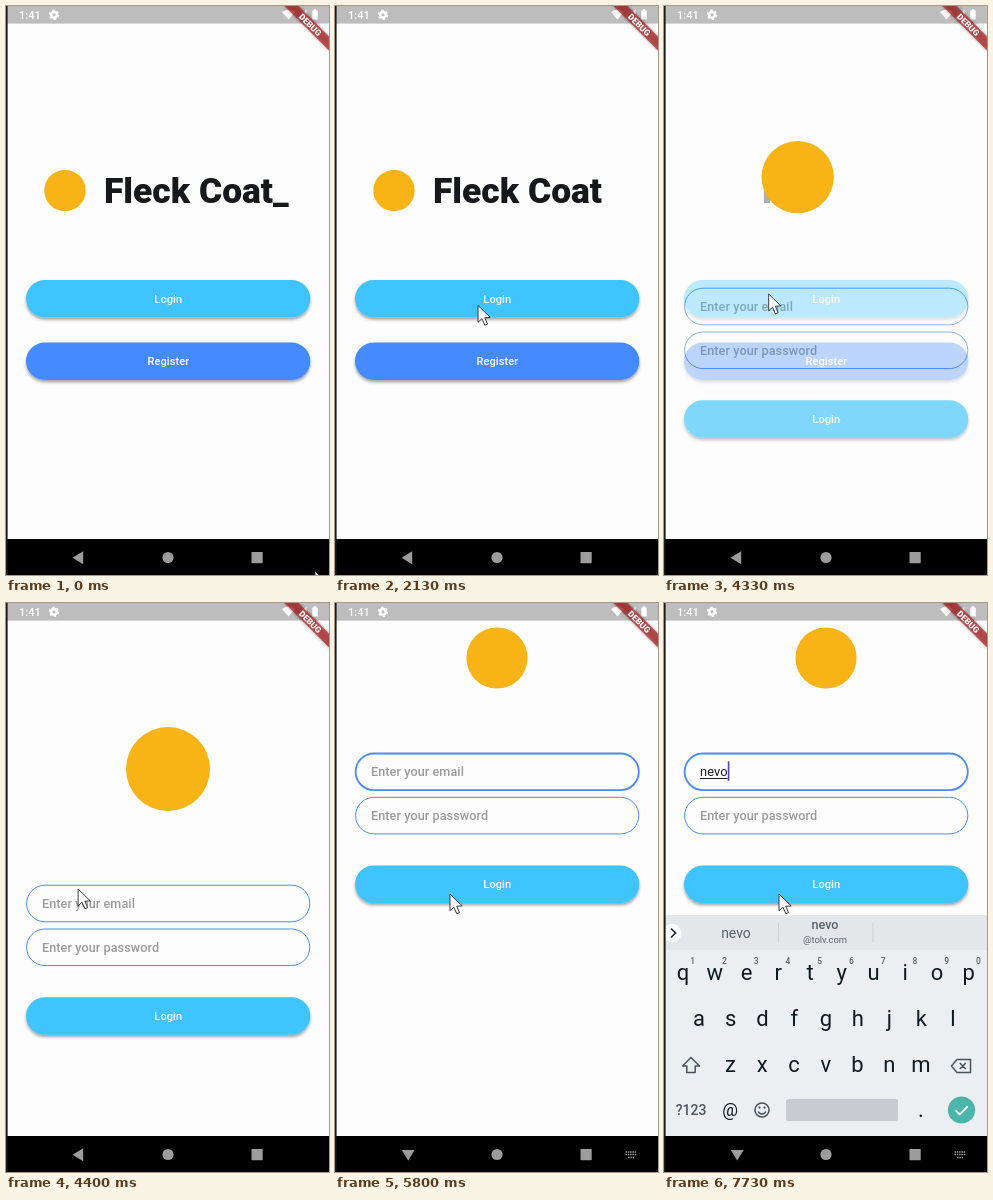
These frames come from a looping animation (323 by 569 pixels, 8 s). An HTML page:

```html
<!DOCTYPE html>
<html lang="en">
<head>
<meta charset="utf-8">
<title>Chat app login</title>
<style>
  html, body { margin: 0; width: 100%; height: 100%; overflow: hidden; background: #fdfdfd; }
  svg { display: block; width: 323px; height: 569px; font-family: Roboto, sans-serif; }
  .title { font-weight: 900; font-size: 35.4px; fill: #17181b; }
  .label { font-weight: 500; font-size: 11px; letter-spacing: .1px; fill: #fff; text-anchor: middle; }
  .hint { font-weight: 500; font-size: 12.6px; letter-spacing: .1px; fill: #9b9b9b; }
  .typed { font-size: 12.9px; letter-spacing: .1px; fill: #1c1c1c; }
  .field { fill: #fdfdfd; stroke: #4a8cf7; }
  .mid { text-anchor: middle; }
  .key { font-size: 22px; fill: #0f1a21; text-anchor: middle; }
  .num { font-size: 8.5px; font-weight: 500; fill: #59656b; text-anchor: middle; }
  .tip { fill: #566268; text-anchor: middle; }
  .line { fill: none; stroke: #46535a; stroke-width: 1.5; stroke-linejoin: round; }
</style>
</head>
<body>
<svg id="stage" viewBox="0 0 323 569">
  <defs>
    <filter id="drop" x="-10%" y="-30%" width="120%" height="180%">
      <feDropShadow dx="0" dy="2.2" stdDeviation="1.8" flood-color="#000" flood-opacity=".36"/>
    </filter>
    <filter id="soft" x="-20%" y="-80%" width="140%" height="260%"><feGaussianBlur stdDeviation="1.8"/></filter>
  </defs>
  <rect width="323" height="569" fill="#fdfdfd"/>

  <g id="home">
    <text id="title" class="title" x="98" y="197"></text>
    <g id="homeButtons"></g>
  </g>

  <g id="login">
    <rect y="18" width="323" height="515" fill="#fdfdfd"/>
    <g id="form">
      <rect id="email" class="field" x="20.6" y="282.2" width="283.2" height="36.6" rx="18.3"/>
      <rect class="field" x="20.6" y="326" width="283.2" height="36.6" rx="18.3" stroke-width="1"/>
      <text id="emailHint" class="hint" x="36" y="305">Enter your email</text>
      <text class="hint" x="36" y="348.7">Enter your password</text>
      <text id="typed" class="typed" x="36" y="305"></text>
      <rect id="under" x="36" y="306.7" height="1" fill="#1c1c1c"/>
      <rect id="caret" y="290" width="1.6" height="19.5" fill="#5a3fb5"/>
      <g id="loginButton"></g>
    </g>
  </g>

  <circle id="logo" fill="#f8b417"/>

  <g id="keyboard">
    <rect y="312" width="323" height="36" fill="#e4e7e9"/>
    <rect y="347" width="323" height="186" fill="#eceff1"/>
    <circle cx="8" cy="330" r="9.3" fill="#fff"/>
    <path d="M7 325.5l4.5 4.5-4.5 4.5" fill="none" stroke="#1c272d" stroke-width="1.7"/>
    <rect id="div1" x="114" y="320" width="1" height="20" fill="#cdd1d4"/>
    <rect id="div2" x="208.5" y="320" width="1" height="20" fill="#cdd1d4"/>
    <text id="tipLeft" class="tip" x="72" y="335" font-size="14"></text>
    <text id="tipMid" class="tip" x="161" font-weight="500"></text>
    <text id="tipSub" class="tip" x="161" y="339.5" font-size="9.4"></text>
    <g id="keys"></g>
    <path class="line" d="M27 454.5l8.5 8.5h-4.3v6.5h-8.4v-6.5h-4.3z"/>
    <path class="line" d="M293 456.5h13.5v13H293l-5.5-6.5zM295.8 460l6 6m0-6l-6 6"/>
    <text class="mid" x="27" y="512" font-size="14" font-weight="500" fill="#4b575d">?123</text>
    <text class="mid" x="66" y="512.5" font-size="17.5" fill="#0f1a21">@</text>
    <circle class="line" cx="98" cy="507" r="7"/>
    <path class="line" d="M94.3 508.5a4 4 0 0 0 7.4 0"/>
    <circle cx="95.5" cy="504.6" r="1.1" fill="#46535a"/>
    <circle cx="100.5" cy="504.6" r="1.1" fill="#46535a"/>
    <rect x="122" y="496" width="112" height="22" rx="2.5" fill="#c8ccd0"/>
    <text class="key" x="257" y="514">.</text>
    <circle cx="297.5" cy="507" r="13.6" fill="#4bb5a9"/>
    <path d="M291.5 507.3l4.2 4.2 8-8.2" fill="none" stroke="#fff" stroke-width="1.8"/>
  </g>

  <rect width="323" height="17.6" fill="#bdbdbd"/>
  <g fill="#fff">
    <text x="13" y="13" font-size="11" font-weight="500">1:41</text>
    <circle cx="48" cy="8.8" r="2.8" fill="none" stroke="#fff" stroke-width="2.4"/>
    <circle cx="48" cy="8.8" r="4.4" fill="none" stroke="#fff" stroke-width="1.6" stroke-dasharray="2.4 2.208"/>
    <path d="M276 6q6.5-5 13 0l-6.5 7.5zM291 13.3h9.5V3.5z"/>
    <path d="M306.3 4.5h1.5V3.3h2.4v1.2h1.5v9h-5.4z"/>
  </g>
  <g transform="translate(323 0) rotate(45)">
    <rect x="-31.5" y="21.5" width="63" height="10" fill="#000" opacity=".38" filter="url(#soft)"/>
    <rect x="-31.5" y="21.5" width="63" height="10" fill="#b71c1c" opacity=".66"/>
    <text class="mid" y="29.6" font-size="8.6" font-weight="900" fill="#fff">DEBUG</text>
  </g>

  <rect y="533" width="323" height="36" fill="#000"/>
  <g fill="#9c9c9c">
    <path id="back"/>
    <circle cx="162" cy="551.5" r="5.6"/>
    <rect x="245.5" y="546" width="11.2" height="11.2" rx=".6"/>
    <path id="kbIcon" d="M290.500 549h11M290.500 551.500h11M293 554.500h6" fill="none" stroke="#9c9c9c" stroke-width="1.400" stroke-dasharray="1.500 .8"/>
  </g>
  <rect width="1.6" height="569" fill="#19191b"/>
  <path id="mouse" d="M0 0V16.8L3.9 13.2 6.8 19.8 9.5 18.6 6.7 12.2 12.2 11.9Z" fill="#fff" stroke="#26282c" stroke-width=".9" stroke-linejoin="round"/>
</svg>
<script>
const LOOP = 8000;
const NAME = "Fleck Coat";
const USER = "nevo";
const $ = id => document.getElementById(id);
const clamp = v => Math.max(0, Math.min(1, v));
const ease = v => 1 - (1 - v) ** 3;
const mix = (a, b, p) => a + (b - a) * p;
const show = (id, on) => $(id).setAttribute("visibility", on ? "visible" : "hidden");
const set = (id, attrs) => { for (const k in attrs) $(id).setAttribute(k, attrs[k]); };

const button = (y, fill, text) =>
  `<rect x="20" y="${y}" width="284.3" height="37.5" rx="18.7" fill="${fill}" filter="url(#drop)"/>` +
  `<text class="label" x="162.3" y="${y + 22.8}">${text}</text>`;
$("homeButtons").innerHTML = button(274, "#40c4ff", "Login") + button(336.5, "#448aff", "Register");
$("loginButton").innerHTML = button(394.3, "#40c4ff", "Login");

const row = (chars, x, y, kind = "key") =>
  [...chars].map((c, i) => `<text class="${kind}" x="${x + i * 31.75}" y="${y}">${c}</text>`).join("");
$("keys").innerHTML = row("qwertyuiop", 19, 376.8) + row("1234567890", 28.7, 361, "num") +
  row("asdfghjkl", 35, 423) + row("zxcvbnm", 66.5, 469);

// Pointer stops: time, x, y
const PATH = [
  [20, 309, 565], [200, 272, 492], [300, 240, 487], [400, 190, 488], [530, 169, 456],
  [640, 169, 456], [800, 150, 450], [1000, 133, 441], [1470, 129, 428], [1520, 129, 427],
  [1700, 124, 400], [1900, 128, 360], [2130, 143, 299.5], [2270, 149, 294], [2370, 149, 294],
  [2530, 152.5, 291], [4230, 152.5, 291], [4400, 72, 286], [4730, 113.5, 290],
  [4900, 113.5, 290], [5000, 115, 291]
];

function pointer(t) {
  const i = PATH.findIndex(k => k[0] > t);
  if (i === 0) return PATH[0].slice(1);
  if (i < 0) return PATH[PATH.length - 1].slice(1);
  const [a, b] = [PATH[i - 1], PATH[i]];
  const p = (t - a[0]) / (b[0] - a[0]);
  return [mix(a[1], b[1], p), mix(a[2], b[2], p)];
}

// Typewriter: blinking tail, pause, then one letter per 400 ms
function title(t) {
  if (t < 1800) return NAME + (Math.floor(t / 400) % 2 ? "" : "_");
  if (t < 2800) return NAME;
  const n = Math.min(2, Math.round((t - 2800) / 400));
  return n ? NAME.slice(0, n) + "_" : "";
}

function draw(t) {
  const page = t < 4270 ? 0 : clamp((t - 4200) / 200);
  const raised = t >= 5800;
  const fly = page * page * (3 - 2 * page);

  $("title").textContent = title(t);
  show("home", page < 1);
  set("login", { opacity: page });
  show("login", page > 0);
  set("form", { transform: `translate(0 ${raised ? -131.7 : 0})` });
  set("email", { "stroke-width": mix(1, 1.8, clamp((t - 5210) / 120)), stroke: t < 5270 ? "#4a8cf7" : "#2672f2" });

  const size = raised ? 102 : mix(69, 140, fly);
  set("logo", {
    cx: mix(59, 162, fly),
    cy: raised ? 55 : mix(184.5, 166, fly),
    r: size * 0.3
  });

  const count = [6730, 6870, 7530, 7600].filter(k => t >= k).length;
  const text = USER.slice(0, count);
  $("typed").textContent = text;
  const w = count ? $("typed").getComputedTextLength() : 0;
  set("under", { width: w });
  set("caret", { x: 36 + w });
  show("emailHint", page > 0 && !count);
  show("caret", t >= 6000);

  const done = t >= 7730;
  const tips = t >= 6800;
  $("tipLeft").textContent = tips ? text : "";
  $("tipMid").textContent = done ? USER : tips ? USER.slice(0, 2) : "";
  $("tipSub").textContent = done ? "@tolv.com" : "";
  set("tipMid", { y: done ? 326 : 335, "font-size": done ? 12.6 : 14 });
  show("div1", tips);
  show("div2", t >= 7530);

  const slide = ease(clamp((t - 5890) / 310));
  set("keyboard", { transform: `translate(0 ${221 * (1 - slide)})` });
  $("keyboard").style.display = t >= 5930 ? "" : "none";
  show("kbIcon", raised);
  set("back", { d: raised ? "M66.8 547h12.8L73.2 557.6z" : "M77.2 545.2v13L66.5 551.7z" });

  set("mouse", { transform: `translate(${pointer(t).join(" ")})` });
}

const start = performance.now();
function tick() {
  draw((performance.now() - start) % LOOP);
  requestAnimationFrame(tick);
}
tick();
</script>
</body>
</html>
```
